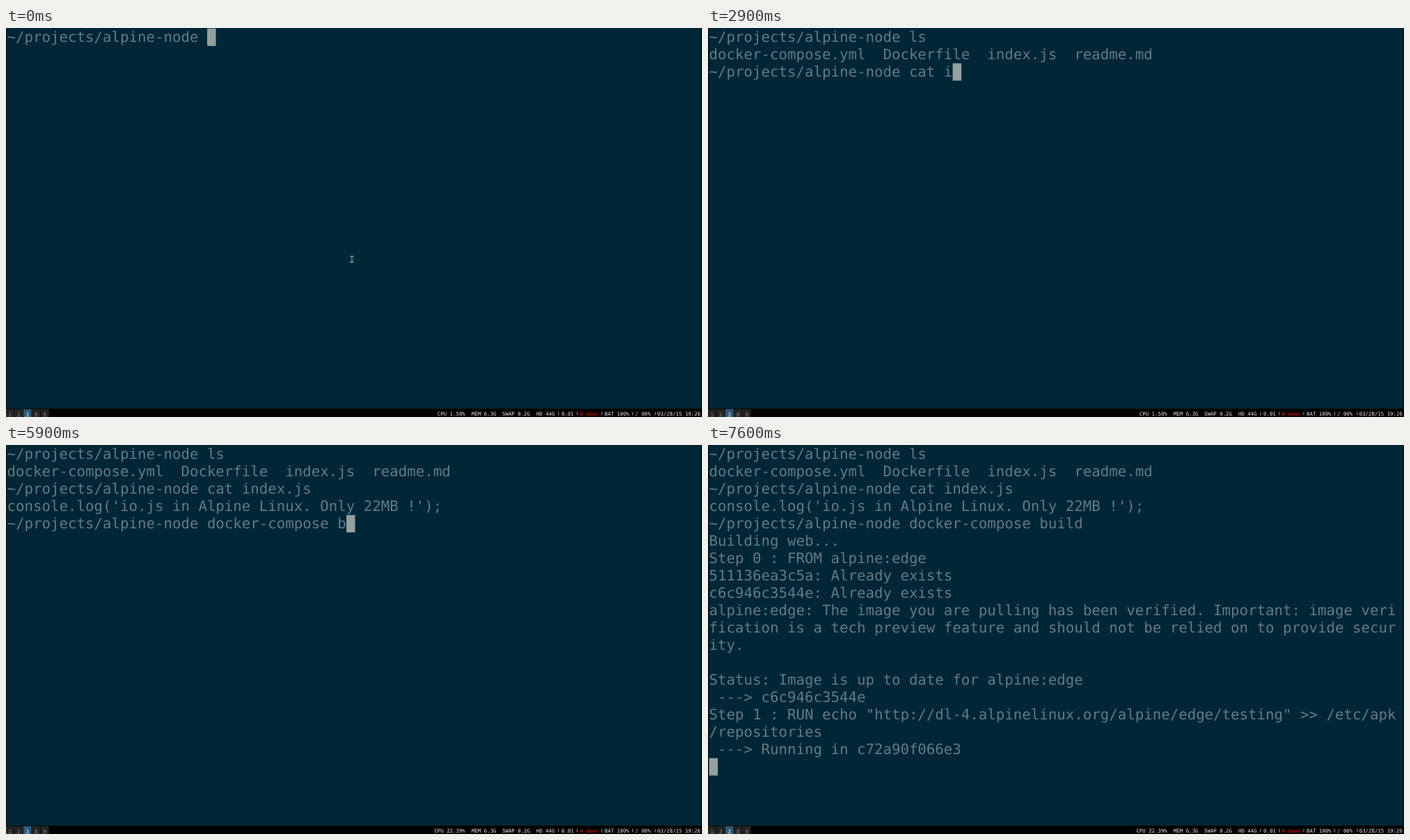
Recreate the animation shown at these times as an HTML page. Size 1000x560 px, loop 8 s.

```html
<!DOCTYPE html>
<html lang="en">
<head>
<meta charset="utf-8">
<title>Terminal session</title>
<style>
  html, body { margin: 0; width: 100%; height: 100%; overflow: hidden; background: #000; }
  svg { display: block; width: 1000px; height: 560px; }
  text { white-space: pre; text-rendering: geometricPrecision; font-family: "DejaVu Sans Mono", monospace; }
  #lines { fill: #627c86; font-size: 20.762px; }
  #bar { font-size: 7.39px; fill: #e6e6e6; }
</style>
</head>
<body>
<svg viewBox="0 0 1000 560">
  <rect width="1000" height="560" fill="#000"/>
  <rect x="0.8" width="998.4" height="548" fill="#012636"/>
  <rect id="caret" width="12.5" height="25" fill="#93a1a1"/>
  <g id="lines"></g>
  <path id="pointer" d="M494.2 328.6h2.2l.6.5.6-.5h2.2M494.2 337h2.2l.6-.5.6.5h2.2M497 329v7.6"
        fill="none" stroke="#8499a1" stroke-width="1.4"/>
  <g id="bar"></g>
</svg>
<script>
const LOOP = 8000, COLS = 79, CELL_W = 12.5, CELL_H = 25, LEFT = 1.56, TOP = 0.78;
const POINTER_END = 100, CPU_CHANGE = 4200;
const PROMPT = '~/projects/alpine-node ';

// [ms, text added, characters deleted first]
const steps = [
  [0, PROMPT],
  [100, 'c'], [300, 'a'], [400, 't'], [500, ' '],
  [800, '', 1], [1100, '', 2], [1200, '', 1],
  [1300, 'l'], [1600, 's'],
  [1800, '\ndocker-compose.yml  Dockerfile  index.js  readme.md\n' + PROMPT],
  [2300, 'c'], [2500, 'a'], [2600, 't '],
  [2900, 'i'], [3000, 'n'], [3100, 'd'], [3200, 'ex.js '],
  [3500, "\nconsole.log('io.js in Alpine Linux. Only 22MB !');\n" + PROMPT],
  [3900, 'd'], [4000, 'o'], [4100, 'c'], [4300, 'k'], [4400, 'e'], [4900, 'r'],
  [5200, '-'], [5400, 'c'], [5500, 'o'], [5600, 'm'], [5700, 'pose '],
  [5900, 'b'], [6100, 'u'], [6300, 'i'], [6400, 'l'], [6500, 'd'],
  [6700, '\n'],
  [6900, 'Building web...\n'],
  [7000, 'Step 0 : FROM alpine:edge\n'],
  [7400, '511136ea3c5a: Already exists\nc6c946c3544e: Already exists\n' +
    'alpine:edge: The image you are pulling has been verified. Important: image verification ' +
    'is a tech preview feature and should not be relied on to provide security.\n\n' +
    'Status: Image is up to date for alpine:edge\n ---> c6c946c3544e\n' +
    'Step 1 : RUN echo "http://dl-4.alpinelinux.org/alpine/edge/testing" >> /etc/apk/repositories\n'],
  [7600, ' ---> Running in c72a90f066e3\n']
];

const byId = id => document.getElementById(id);
const lines = byId('lines'), caret = byId('caret'), pointer = byId('pointer'), bar = byId('bar');

function add(parent, tag, attrs, content = '') {
  const el = document.createElementNS('http://www.w3.org/2000/svg', tag);
  for (const key in attrs) el.setAttribute(key, attrs[key]);
  el.textContent = content;
  return parent.appendChild(el);
}

function drawBar() {
  ['1', '2', '3', '8', '9'].forEach((name, i) => {
    const on = name === '3', x = i * CELL_W;
    add(bar, 'rect', {
      x: x + 0.4, y: 549.3, width: 10.6, height: 10.3, 'stroke-width': 0.8,
      fill: on ? '#285577' : '#222', stroke: on ? '#4c7899' : '#333'
    });
    add(bar, 'text', { x: x + 5.7, y: 558.8, 'text-anchor': 'middle', fill: on ? '#fff' : '#888' }, name);
  });
  const blocks = [
    [669, 'MEM 6.3G'], [713, 'SWAP 0.2G'], [762, 'HD 44G'], [798, '0.01'],
    [824.5, 'W down', '#e81414'], [860, 'BAT 100%'], [904, '♪ 00%'], [935.7, '03/28/15 19:26']
  ];
  for (const [x, label, fill = '#e6e6e6'] of blocks) add(bar, 'text', { x, y: 558, fill }, label);
  for (const x of [793.5, 820.5, 855.5, 900, 932.5])
    add(bar, 'rect', { x, y: 552.5, width: 0.8, height: 5, fill: '#c4c4c4' });
  return add(bar, 'text', { x: 659.8, y: 558, 'text-anchor': 'end' });
}

function wrap(text) {
  return text.split('\n').flatMap(line => line.match(new RegExp(`.{1,${COLS}}`, 'g')) || ['']);
}

function drawScreen(count) {
  let text = '';
  for (const [, typed, erased = 0] of steps.slice(0, count))
    text = text.slice(0, text.length - erased) + typed;
  const rows = wrap(text);
  lines.replaceChildren();
  rows.forEach((row, i) => add(lines, 'text', { x: LEFT, y: 20.2 + i * CELL_H }, row));
  caret.setAttribute('x', LEFT + rows[rows.length - 1].length * CELL_W);
  caret.setAttribute('y', TOP + (rows.length - 1) * CELL_H);
}

const cpu = drawBar();
let shown = 0;

function render() {
  const t = performance.now() % LOOP;
  const count = steps.filter(([at]) => at <= t).length;
  if (count !== shown) drawScreen(shown = count);
  pointer.style.display = t < POINTER_END ? '' : 'none';
  const load = t < CPU_CHANGE ? 'CPU 1.50%' : 'CPU 22.39%';
  if (cpu.textContent !== load) cpu.textContent = load;
  requestAnimationFrame(render);
}
render();
</script>
</body>
</html>
```
